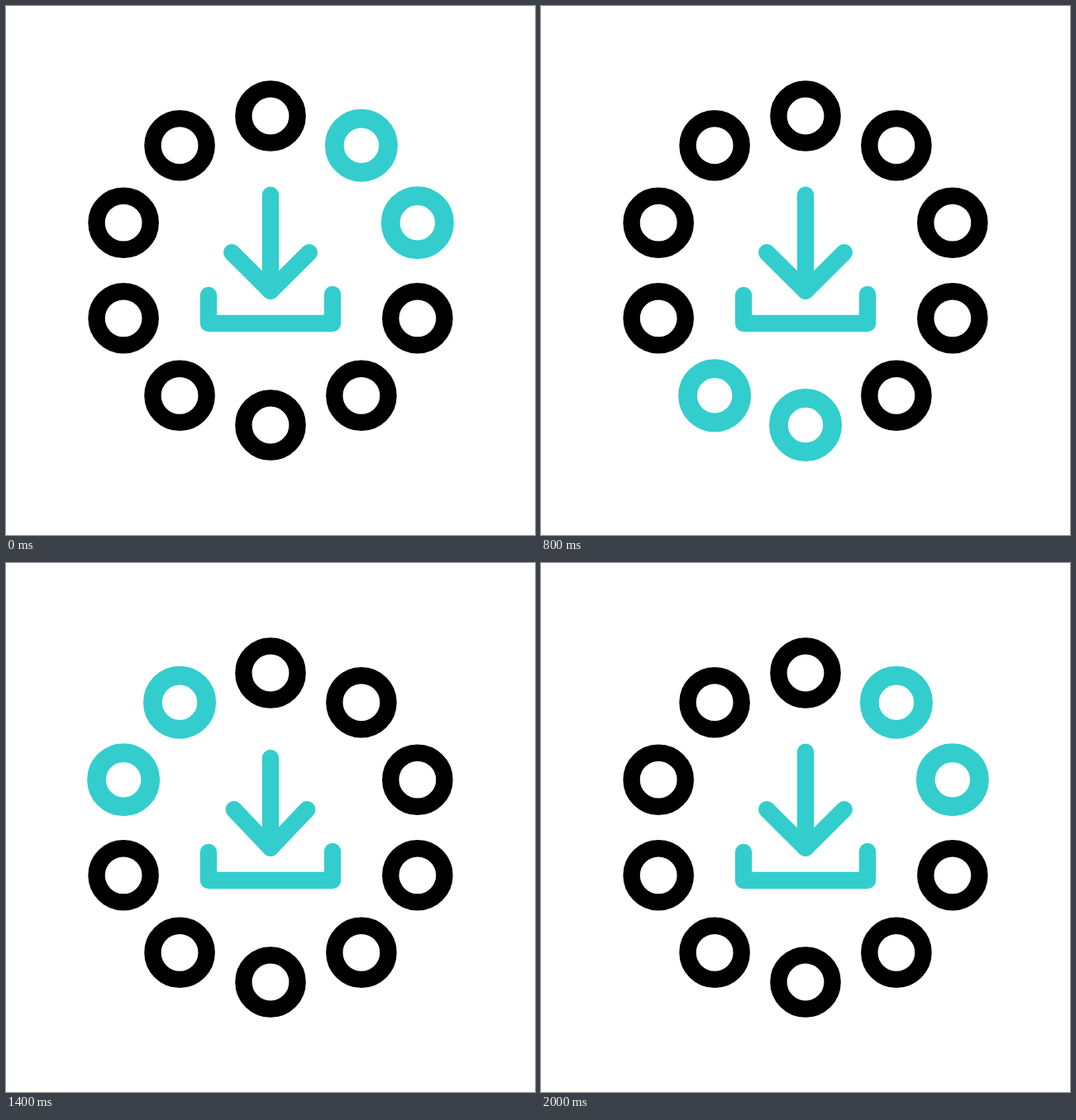
Recreate the animation shown at these times as an HTML page with a canvas. Size 640 px wide and 640 px high, loop 2.02 s.

```html
<!DOCTYPE html>
<html lang="en">
<head>
<meta charset="utf-8">
<title>Download loader</title>
<style>
html, body { margin: 0; width: 100%; height: 100%; overflow: hidden; background: #fff; }
canvas { display: block; width: 640px; height: 640px; }
</style>
</head>
<body>
<canvas id="stage" width="640" height="640"></canvas>
<script>
const ctx = document.getElementById('stage').getContext('2d');
const LOOP = 2020, TICK = 20, STEP = 200, BOUNCE = 400;
const TOP = 152, LOW = 250; // bounce phases of the highest and lowest pose
const TEAL = '#33cdcd', BLACK = '#000';

const ease = t => (1 - Math.cos(Math.PI * t)) / 2;

// 0 at the highest pose, depth at the lowest: quick fall, slower return
function drop(phase, depth, skew) {
  const p = phase < TOP ? phase + BOUNCE : phase;
  if (p < LOW) return depth * ease((p - TOP) / (LOW - TOP));
  const t = (p - LOW) / (TOP + BOUNCE - LOW);
  return depth * (1 - ease(Math.pow(t, skew)));
}

function line(...points) {
  ctx.beginPath();
  points.forEach(([x, y]) => ctx.lineTo(x, y));
  ctx.stroke();
}

function drawRings(time) {
  const step = Math.floor(time / STEP);
  for (let i = 0; i < 10; i++) {
    const lit = (i - step + 19) % 10 < 2;
    const a = i * Math.PI / 5;
    ctx.strokeStyle = lit ? TEAL : BLACK;
    ctx.lineWidth = lit ? 22.8 : 20.4;
    ctx.beginPath();
    ctx.arc(320 + 187 * Math.sin(a), 320 - 187 * Math.cos(a), 32.6, 0, 2 * Math.PI);
    ctx.stroke();
  }
}

function drawArrow(time) {
  const phase = time % BOUNCE;
  const shape = drop(phase, 1.14, 0.83);
  const tip = 327.7 + 32 * drop(phase, 1.1, 0.96);
  const top = 190.2 + 83 * shape;
  const spread = 60.5 - 29.5 * shape;
  const wing = tip - 46.5;
  line([320, top], [320, tip]);
  line([320 - spread, wing], [320, tip], [320 + spread, wing]);
}

function draw(time) {
  ctx.fillStyle = '#fff';
  ctx.fillRect(0, 0, 640, 640);
  drawRings(time);
  ctx.strokeStyle = TEAL;
  ctx.lineWidth = 20.4;
  ctx.lineCap = ctx.lineJoin = 'round';
  line([245, 350], [245, 384], [395, 384], [395, 349]);
  drawArrow(time);
}

const start = performance.now();
function frame() {
  const time = (performance.now() - start) % LOOP;
  draw(Math.floor(time / TICK) * TICK);
  requestAnimationFrame(frame);
}
frame();
</script>
</body>
</html>
```
